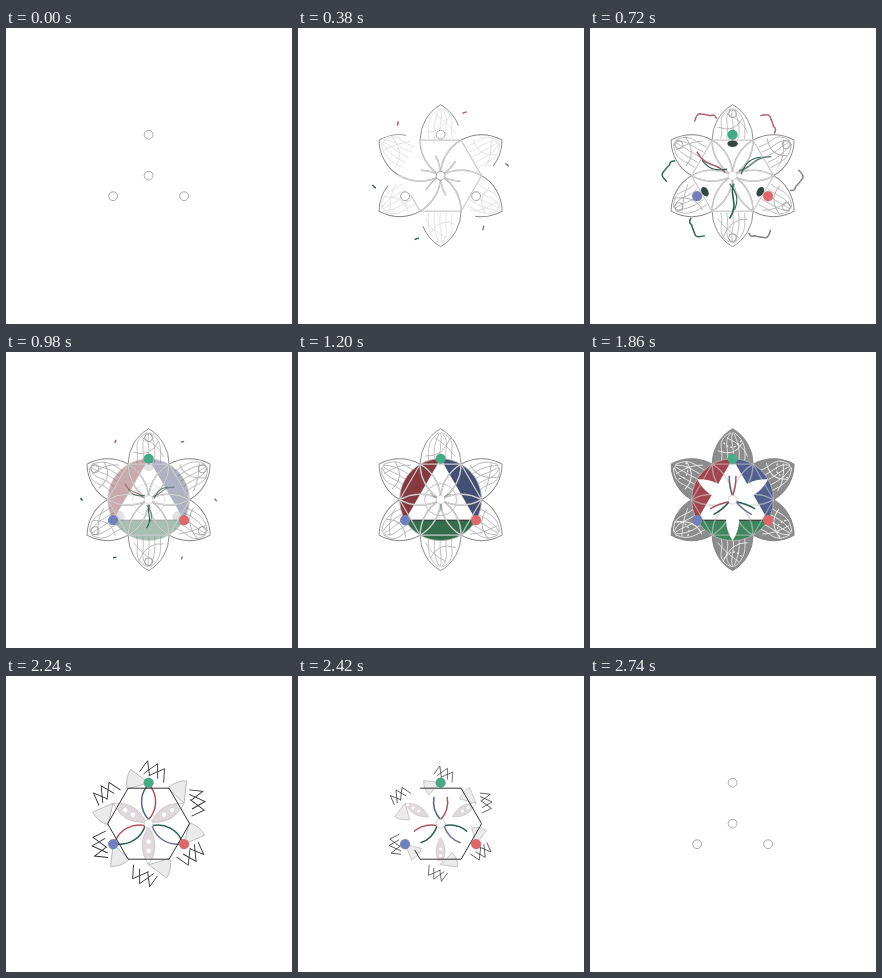
Write an HTML page that moves like this. It is 286 px wide and 296 px high and loops after 3020 ms.

```html
<!DOCTYPE html>
<html lang="en">
<head>
<meta charset="utf-8">
<title>Flower loop</title>
<style>
html, body { margin: 0; width: 100%; height: 100%; overflow: hidden; background: #fff; }
svg { display: block; width: 100%; height: 100%; }
</style>
</head>
<body>
<svg viewBox="0 0 286 296"><g id="art" fill="none" transform="translate(142.6 147.7)"></g></svg>
<script>
const LOOP = 3020, R = 41, H = R / 2, V = R * Math.sqrt(3) / 2, TIP = 2 * V;
const art = document.getElementById('art');
const RED = [160, 68, 75], BLUE = [80, 93, 140], GREEN = [61, 132, 91];
const DOTS = ['#48aa84', '#de676b', '#7180bd'];
const ARCS = [BLUE, GREEN, RED];
const STEMS = ['#718083', '#285f4e', '#a9656e'];
const LENS = [['#52657d', '#ad555d'], ['#285f52', '#6e7797'], ['#285f52', '#ad555d']];
const HOOKS = ['#b3646e', '#828188', '#828188', '#2d6958', '#2d6958', '#b3646e'];

const clamp = x => Math.max(0, Math.min(1, x));
const ramp = (t, a, b) => {
  const x = clamp((t - a) / (b - a));
  return x * x * (3 - 2 * x);
};
const pulse = (t, a, b, c, d) => ramp(t, a, b) * (1 - ramp(t, c, d));
const path = (d, attrs = '') => `<path d="${d}" ${attrs}/>`;
const line = (d, color, width = 1, extra = '') =>
  path(d, `stroke="${color}" stroke-width="${width}" ${extra}`);
const trace = (d, amount, color, width = 1) => amount <= 0 ? '' :
  line(d, color, width, `pathLength="1" stroke-dasharray="${amount} 2"`);
const disc = (x, y, r, fill, stroke = 'none', width = .7) =>
  `<circle cx="${x}" cy="${y}" r="${r}" fill="${fill}" stroke="${stroke}" stroke-width="${width}"/>`;
const group = (body, transform = '', alpha = 1) =>
  alpha <= 0 ? '' : `<g transform="${transform}" opacity="${alpha}">${body}</g>`;
const spin = (n, draw, offset = 0) => Array.from({ length: n }, (_, i) =>
  group(draw(i), `rotate(${offset + i * 360 / n})`)).join('');
const shade = (rgb, k) => `rgb(${rgb.map(v => Math.round(v * k))})`;

const inner = `M${-H} ${-V}A${R} ${R} 0 0 0 0 0A${R} ${R} 0 0 0 ${H} ${-V}`;
const outer = `M${-H} ${-V}A${R} ${R} 0 0 1 0 ${-TIP}A${R} ${R} 0 0 1 ${H} ${-V}`;
const hexagon = `M${-H} ${-V}H${H}L${R} 0L${H} ${V}H${-H}L${-R} 0Z`;
const segment = `M${-V} ${H}A${R} ${R} 0 0 0 ${V} ${H}Z`;
const blade = `M0 -3C-9 -17 -8 -28 0 ${-R}C8 -28 9 -17 0 -3Z`;
const hook = 'M-38 -54Q-36 -62 -33 -62Q-25 -61 -22 -60Q-18 -62 -16 -57';

function veins(t, i, color) {
  const sway = 3 * Math.sin(t / 170 + i);
  let out = '';
  for (let k = -2; k <= 2; k++) {
    out += line(`M${k} -67C${k * 8 + sway} -58 ${k * 5 - sway} -50 ${k * 6} -37`, color, .8);
  }
  out += line(`M-15 ${-46 + sway}Q2 -42 10 ${-60 - sway}`, color, .9);
  return out + line(`M-6 -62Q${9 - sway} -54 15 -43`, color, .8);
}

function flower(t) {
  const grow = ramp(t, 0, 520);
  if (!grow || t >= 2230) return '';
  const fade = 1 - ramp(t, 2170, 2230);
  const solid = ramp(t, 1640, 1840);
  const tone = solid > .5 ? '#f0f0f0' : '#b2b2b2';
  let out = spin(6, i => {
    let petal = path(outer + 'Z', `fill="#8c8c8c" fill-opacity="${solid}"`);
    petal += group(veins(t, i, tone), '', ramp(t, 240, 560));
    petal += trace(outer, grow, '#858585', .9);
    petal += group(disc(0, -62, 4, 'none', '#a5a5a5', 1), '', pulse(t, 350, 560, 1000, 1160));
    petal += group(line('M-9 -57Q0 -46 10 -61', '#fff', 1.1, 'stroke-dasharray="2 2"'), '', solid);
    return petal;
  });
  return group(out, '', fade);
}

function grid(t) {
  const grow = ramp(t, 60, 540);
  const alpha = 1 - ramp(t, 2100, 2170);
  const soft = 1 - .4 * ramp(t, 1640, 1850);
  const arcs = spin(6, () => trace(inner, grow, '#aaa', 1.5) + trace(inner, grow, '#e6e6e6', .7));
  return group(arcs + trace(hexagon, grow, '#c9c9c9', 1.2), '', alpha * soft);
}

function ring(t) {
  const alpha = pulse(t, 900, 1080, 2160, 2185);
  if (!alpha) return '';
  const light = .82 + .2 * ramp(t, 1120, 1580);
  let out = spin(3, i => path(segment, `fill="${shade(ARCS[(i + 1) % 3], light)}"`));
  out += disc(0, 0, R, 'none', '#bbb', .8);
  out += group(disc(0, 0, 16, 'none', '#b0b0b0', .8), '', 1 - ramp(t, 1540, 1700));
  return group(out + line(`M${-V} ${H}H${V}`, '#222', 1), '', alpha);
}

function hooks(t) {
  const amount = pulse(t, 300, 640, 740, 1040);
  return amount ? group(spin(6, i => trace(hook, amount, HOOKS[(i + 5) % 6], 1.5)),
    `rotate(${(t - 720) / 60})`) : '';
}

function stems(t) {
  const size = pulse(t, 480, 680, 800, 1180) * .72 + .28;
  const alpha = pulse(t, 480, 580, 1220, 1420);
  const curve = 'M-1 -8C4 -20 -7 -27 3 -43';
  const twin = 'M3 -8C-5 -18 -6 -24 -2 -34';
  return group(spin(3, i => line(curve, STEMS[i], 1.6) +
    line(twin, STEMS[1], 1.1), 60), `scale(${size})`, alpha);
}

function blades(t) {
  const grow = ramp(t, 1320, 1640);
  if (!grow) return '';
  const white = ramp(t, 1610, 1800), end = ramp(t, 2260, 2720);
  const fill = t > 2180 ? '#e0d9dc' : '#fff';
  const body = () => {
    const edge = t > 2180 ? '#b9b0b4' : 'none';
    let out = path(blade, `fill="${fill}" fill-opacity="${.65 + .35 * white}" stroke="${edge}" stroke-width=".6"`);
    if (white < 1) {
      out += path('M0 -4L-6 -19Q0 -22 6 -19Z', `fill="#777" opacity="${1 - white}"`);
    }
    const seen = ramp(t, 2160, 2220);
    for (let k = 0; k < 3 && seen; k++) {
      out += disc(0, -18 - k * 9 - end * 4, 2.2, `rgba(255,255,255,${seen})`);
    }
    return group(out, `translate(0 ${-R * end}) scale(${(1 - end) * grow} ${1 - end})`);
  };
  return spin(3, body, 60);
}

function lenses(t) {
  const amount = pulse(t, 1500, 2130, 2280, 2660);
  const bend = 9 * ramp(t, 1600, 2160);
  return spin(3, i => [-1, 1].map((side, k) =>
    trace(`M0 -4C${side * bend} -14 ${side * bend} -28 ${side * 2} ${-R + 4}`,
      amount, LENS[i][k], 1.5)).join(''));
}

function fans(t) {
  const open = pulse(t, 2150, 2230, 2300, 2680);
  if (!open) return '';
  const turn = -80 - (t - 2240) * .16;
  return spin(6, i => {
    const spikes = line('M-9 -52L-1 -63L1 -48M-5 -50L9 -60L9 -45M0 -48L16 -55L15 -41', '#333', .9);
    const wedge = path('M0 0L-10 -20Q1 -24 10 -20Z', 'fill="#ebebeb" stroke="#aaa" stroke-width=".7"');
    return group(spikes, `translate(0 ${-R * (1 - open)}) scale(${open})`) +
      group(wedge, `translate(0 ${-R}) rotate(${turn}) scale(${open})`);
  });
}

function frame(t) {
  const edge = pulse(t, 2140, 2180, 2300, 2640);
  return spin(3, i => {
    const on = pulse(t, 550, 690, 2440, 2690);
    const cap = pulse(t, 570, 680, 800, 1040);
    return disc(0, -R, 4.4, '#fff', '#777', .6) +
      group(disc(0, -R, 5, DOTS[i]), '', on) +
      group('<ellipse cx="0" cy="-32" rx="5.2" ry="3.3" fill="#344641"/>', '', cap);
  }) + disc(0, 0, 4.4, '#fff', t > 560 && t < 2640 ? '#bbb' : '#777', .6) +
    trace(hexagon, edge, '#333', 1);
}

function draw(now) {
  const t = now % LOOP;
  art.innerHTML = flower(t) + ring(t) + grid(t) + fans(t) + hooks(t) +
    stems(t) + blades(t) + lenses(t) + frame(t);
}

const start = performance.now();
function tick() {
  draw(performance.now() - start);
  requestAnimationFrame(tick);
}
tick();
</script>
</body>
</html>
```
